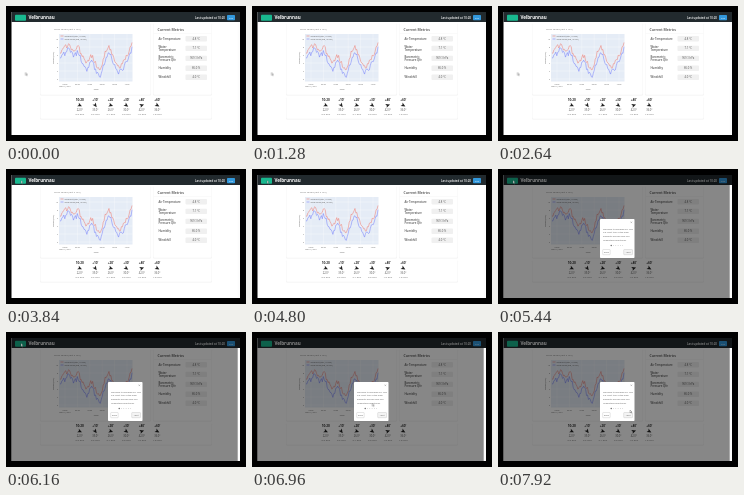
Animation, 240 px wide and 135 px high, one loop 8000 ms. Source, as an HTML page:

```html
<!DOCTYPE html>
<html lang="en">
<head>
<meta charset="utf-8">
<title>Weather station</title>
<style>
  html, body { margin: 0; width: 100%; height: 100%; overflow: hidden; background: #000; }
  svg { display: block; width: 100vw; height: 100vh; }
  text { font-family: "Open Sans", Arial, sans-serif; fill: #555; }
  .shade { animation: shade 8s linear infinite; }
  .tour { animation: tour 8s linear infinite; }
  .pointer { animation: pointer 8s ease-in-out infinite; }
  @keyframes shade {
    0%, 63.9% { opacity: 0; }
    65% { opacity: .15; }
    67.5%, 100% { opacity: .47; }
  }
  @keyframes tour {
    0%, 63.9% { opacity: 0; }
    65% { opacity: .75; }
    66%, 100% { opacity: 1; }
  }
  @keyframes pointer {
    0%, 42% { transform: translate(19.5px, 66.5px); }
    47%, 80% { transform: translate(15px, 11.5px); }
    89%, 100% { transform: translate(132px, 78px); }
  }
</style>
</head>
<body>
<svg id="stage" viewBox="0 0 240 135" preserveAspectRatio="none">
  <rect width="240" height="135"/>
  <rect x="5.5" y="6" width="228.5" height="123" fill="#fff"/>
  <g id="header"></g>
  <g id="chart"></g>
  <g id="metrics"></g>
  <g id="forecast"></g>
  <rect class="shade" x="5.5" y="6" width="228.5" height="123"/>
  <rect x="231.7" y="16" width="2.3" height="113" fill="#fcfcfc"/>
  <g id="tour" class="tour"></g>
  <path class="pointer" d="M0 0v2.8l.7-.6.5 1 .4-.2-.5-1h.9z" fill="#fff" stroke="#333" stroke-width=".3"/>
</svg>
<script>
const NS = "http://www.w3.org/2000/svg";
const layer = id => document.getElementById(id);

function add(parent, tag, attrs, content) {
  const node = document.createElementNS(NS, tag);
  for (const key in attrs) node.setAttribute(key, attrs[key]);
  if (content) node.textContent = content;
  parent.append(node);
  return node;
}
const box = (parent, x, y, width, height, fill, more) =>
  add(parent, "rect", { x, y, width, height, fill, ...more });
const label = (parent, x, y, size, content, more) =>
  add(parent, "text", { x, y, "font-size": size, ...more }, content);
const line = (parent, d, stroke, width = 0.3) =>
  add(parent, "path", { d, stroke, "stroke-width": width, fill: "none", "stroke-linejoin": "round" });
const middle = { "text-anchor": "middle" };

function card(parent, x, y, width, height) {
  box(parent, x, y + 0.4, width, height, "#f2f2f2", { rx: 1 });
  box(parent, x + 0.4, y, width - 0.8, height - 0.2, "#fff", { rx: 1 });
}

function drawHeader() {
  const g = layer("header");
  box(g, 5.5, 6, 228.5, 10, "#222a2e");
  box(g, 9, 8.7, 11, 6, "#19b88f", { rx: 0.8 });
  label(g, 22.4, 13.3, 4.5, "Velbrunnau", { style: "fill:#fff;font-weight:700" });
  label(g, 219, 12.8, 2.9, "Last updated at 10:20", { "text-anchor": "end", style: "fill:#fff;font-weight:600" });
  box(g, 221, 9, 8, 5.3, "#3298dc", { rx: 0.7 });
  label(g, 225, 12.5, 2.4, "Info", { ...middle, style: "fill:#fff" });
}

// Evenly spaced anchors with a seeded wobble between them.
function windPath(anchors, seed) {
  const steps = 75;
  let d = "";
  for (let i = 0; i <= steps; i++) {
    const at = i / steps * (anchors.length - 1);
    const k = Math.min(Math.floor(at), anchors.length - 2);
    const base = anchors[k] + (anchors[k + 1] - anchors[k]) * (at - k);
    const noise = Math.sin((i + seed) * 127.1) * 43758.5;
    const y = base + (noise - Math.floor(noise) - 0.5) * 5;
    d += `${i ? "L" : "M"}${(54 + i * 72 / steps).toFixed(2)} ${y.toFixed(2)}`;
  }
  return d;
}

function drawChart() {
  const g = layer("chart");
  card(g, 34, 17, 111, 72);
  label(g, 48, 24, 2.5, "Wind speed (last 6 hrs)", { style: "fill:#777" });
  box(g, 53, 28, 73.5, 47.5, "#e5ecf6");
  for (let i = 0; i < 6; i++) {
    const x = 59 + i * 12.4, y = 33 + i * 8;
    line(g, `M${x} 28V75.5`, "#fff");
    line(g, `M53 ${y}H126.5`, "#fff");
    label(g, 52, y + 0.7, 1.9, String(10 - i * 2), { "text-anchor": "end" });
    label(g, x, 78.5, 1.9, `${String(5 + i).padStart(2, "0")}:00`, middle);
  }
  label(g, 59, 81, 1.9, "Mar 14, 2021", middle);
  label(g, 90, 84, 2.2, "Time", middle);
  label(g, 0, 0, 2.2, "Speed (m/s)", { ...middle, transform: "translate(48 52) rotate(-90)" });
  line(g, windPath([46, 41, 38, 45, 40, 51, 57, 49, 59, 64, 47, 41, 52, 61, 57, 49, 36], 3), "#ef6a5c", 0.45);
  line(g, windPath([51, 48, 42, 50, 46, 57, 64, 54, 65, 70, 54, 47, 58, 66, 62, 55, 43], 19), "#636efa", 0.45);
  line(g, "M54.5 30H57.5", "#ef6a5c", 0.5);
  line(g, "M54.5 33H57.5", "#636efa", 0.5);
  label(g, 58.5, 30.7, 1.9, "Wind gust (max, 10 min)");
  label(g, 58.5, 33.7, 1.9, "Wind speed (avg, 10 min)");
}

function drawMetrics() {
  const g = layer("metrics");
  card(g, 147, 17, 59, 72);
  label(g, 151.6, 24.7, 3.5, "Current Metrics", { style: "fill:#444;font-weight:600" });
  line(g, "M147.5 27.5H205.5", "#eee");
  const rows = [
    [32.7, "4.8 °C", "Air Temperature"],
    [42.4, "7.1 °C", "Water", "Temperature"],
    [52.4, "969.1 hPa", "Barometric", "Pressure Qfe"],
    [62.3, "86.0 %", "Humidity"],
    [71.3, "4.0 °C", "Windchill"]
  ];
  for (const [y, value, ...names] of rows) {
    names.forEach((name, i) =>
      label(g, 152.5, y + 1 + (i - (names.length - 1) / 2) * 3.7, 2.8, name, { style: "font-weight:600" }));
    box(g, 179.5, y - 2.7, 21.5, 5.4, "#f0f0f0", { rx: 0.8 });
    label(g, 190.2, y + 1, 2.7, value, middle);
  }
}

function drawForecast() {
  const g = layer("forecast");
  card(g, 34, 91, 172, 22);
  const columns = [
    ["10:20", 25, "22.0°", "0.3 m/s"],
    ["+10'", 55, "35.0°", "2.2 m/s"],
    ["+20'", 20, "26.0°", "2.1 m/s"],
    ["+30'", 35, "30.0°", "2.0 m/s"],
    ["+40'", -20, "42.0°", "1.9 m/s"],
    ["+60'", 30, "36.0°", "1.8 m/s"]
  ];
  columns.forEach(([time, turn, angle, speed], i) => {
    const x = 73.8 + i * 15.5;
    label(g, x, 94.8, 3.2, time, { ...middle, style: "fill:#333;font-weight:700" });
    add(g, "path", {
      d: "M2.4 0L-2 2L-1 0L-2 -2Z", fill: "#222",
      transform: `translate(${x} 99.3) rotate(${turn})`
    });
    label(g, x, 105.4, 2.6, angle, middle);
    label(g, x, 109.4, 2.5, speed, middle);
  });
}

function drawButton(parent, x, width, name, fill) {
  box(parent, x, 80.5, width, 5.2, fill, { rx: 0.6, stroke: "#aaa", "stroke-width": 0.3 });
  label(parent, x + width / 2, 83.9, 2.2, name, { ...middle, style: "fill:#555" });
}

function drawTour() {
  const g = layer("tour");
  box(g, 102, 50, 34.5, 39, "#fff", { rx: 0.8 });
  line(g, "M132.6 52.6l1.5 1.5m0-1.5l-1.5 1.5", "#777", 0.35);
  ["Welcome to Windpad CH. This", "is a short tour of the main", "elements and will help you", "understand everything."]
    .forEach((words, i) => label(g, 105, 60.7 + i * 3.6, 2.15, words));
  for (let i = 0; i < 6; i++) {
    add(g, "circle", { cx: 113.2 + i * 2.3, cy: 76.5, r: i ? 0.45 : 0.65, fill: i ? "#bbb" : "#555" });
  }
  drawButton(g, 104.7, 7.5, "Back", "#fff");
  drawButton(g, 125.7, 8.8, "Next", "#f4f4f4");
}

drawHeader();
drawChart();
drawMetrics();
drawForecast();
drawTour();
</script>
</body>
</html>
```
